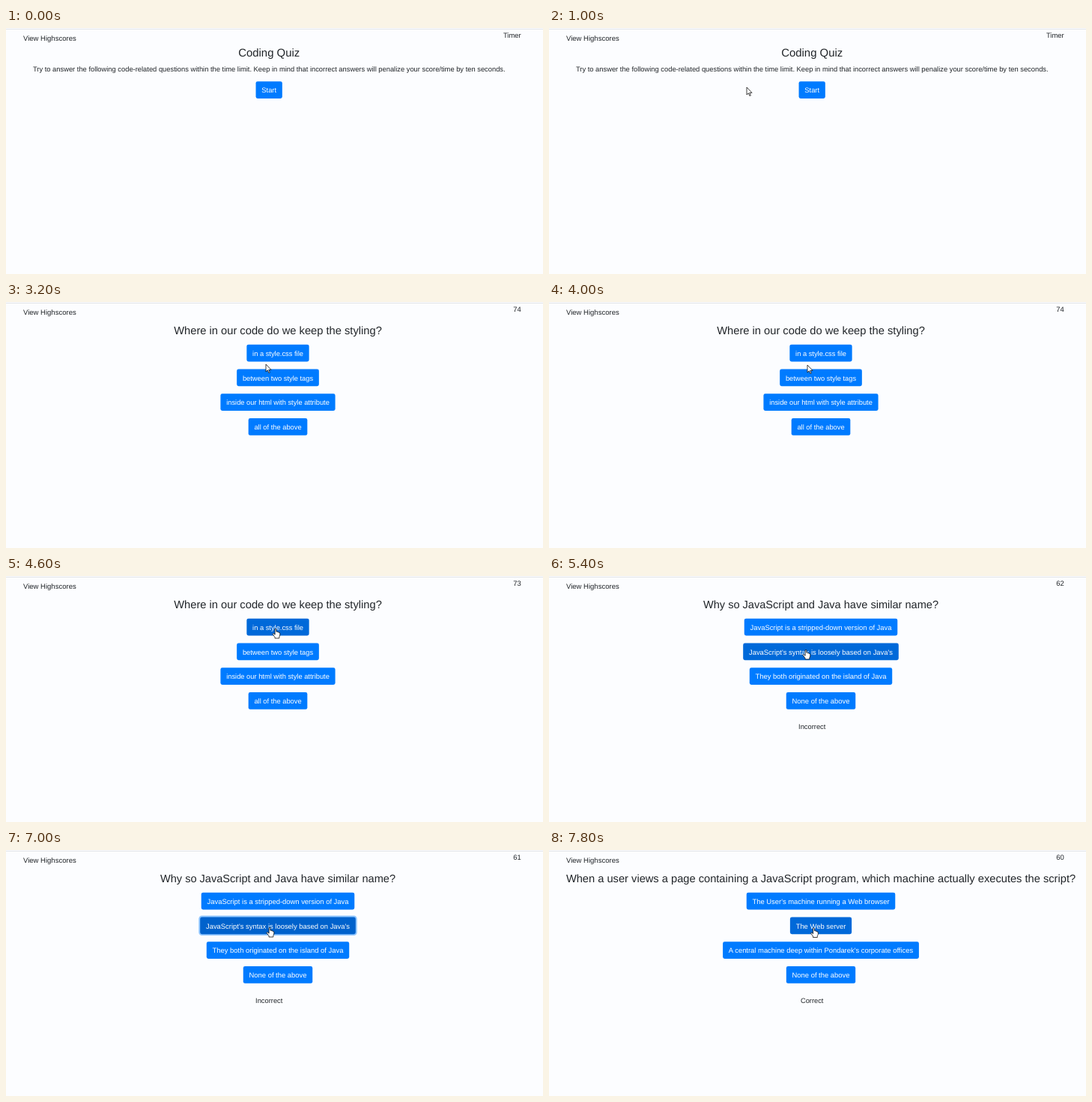
Animation of 717x328 px, one loop 8 s. Source, as an HTML page with a canvas:

```html
<!DOCTYPE html>
<html lang="en">
<head>
<meta charset="utf-8">
<title>Coding Quiz</title>
<style>
  html, body { margin: 0; height: 100%; overflow: hidden; background: #fcfdff; }
  canvas { display: block; }
</style>
</head>
<body>
<canvas id="stage" width="717" height="328"></canvas>
<script>
const ctx = document.getElementById('stage').getContext('2d');
const LOOP = 8000, STEP = 200;
const INK = '#212529';

// Each screen lasts until its end time; sizes are in px.
const screens = [
  { until: 2200, buttons: ['Start'], size: 9.4, mid: 351.2, top: 71.2 },
  { until: 5000, title: 'Where in our code do we keep the styling?', titleSize: 14.7, size: 9.32,
    buttons: ['in a style.css file', 'between two style tags',
      'inside our html with style attribute', 'all of the above'] },
  { until: 7200, title: 'Why so JavaScript and Java have similar name?', titleSize: 14.57, size: 9.43,
    result: 'Incorrect',
    buttons: ['JavaScript is a stripped-down version of Java',
      "JavaScript's syntax is loosely based on Java's",
      'They both originated on the island of Java', 'None of the above'] },
  { until: LOOP, title: 'When a user views a page containing a JavaScript program, which machine actually executes the script?',
    titleSize: 14.67, size: 9.42, result: 'Correct',
    buttons: ["The User's machine running a Web browser", 'The Web server',
      "A central machine deep within Pondarek's corporate offices", 'None of the above'] }
];

// Pointer route: time, x, y
const route = [
  [200, 665, 8], [400, 545, 34], [800, 176, 72], [1200, 352, 86], [1400, 351, 85],
  [2000, 352, 83], [2200, 347, 83], [3200, 347, 83], [3400, 294, 112], [3600, 340, 166],
  [3800, 310, 117], [4000, 345, 84], [4200, 352, 84], [4400, 358, 74], [4600, 360, 70],
  [5000, 360, 70], [5400, 343, 98], [5600, 312, 116], [6000, 281, 172], [6200, 276, 184],
  [6400, 290, 150], [6600, 340, 105], [6800, 352, 103], [7200, 352, 103], [7800, 353.5, 103.5]
];
const clicks = [2000, 4800, 7000];

const arrow = new Path2D('M0 0V10L2.3 7.9L3.9 11.5L5.4 10.9L3.8 7.4H7Z');
const hand = new Path2D('M-.9.8Q0-.4.9.8V4.2Q2.6 3.8 2.7 4.8Q4.2 4.4 4.3 5.4Q5.8 5.2 5.8 6.6V9L4.8 11.2V13H-1V11.5L-4 7.5Q-3.6 6-2.2 7L-.9 8.2Z');

function setFont(size) {
  ctx.font = `${size}px "Liberation Sans", Arial, sans-serif`;
  ctx.textRendering = 'geometricPrecision';
}

function text(str, x, y, size, align = 'center', color = INK) {
  setFont(size);
  ctx.textAlign = align;
  ctx.fillStyle = color;
  ctx.fillText(str, x, y);
}

function pointerAt(t) {
  if (t < route[0][0]) return null;
  const i = route.findIndex(p => p[0] > t);
  if (i < 0) return route[route.length - 1].slice(1);
  const [t0, x0, y0] = route[i - 1], [t1, x1, y1] = route[i];
  const k = (t - t0) / (t1 - t0);
  return [x0 + (x1 - x0) * k, y0 + (y1 - y0) * k];
}

// Draws a button and tells whether the pointer is over it.
function button(label, mid, top, size, pointer, pressed) {
  setFont(size);
  const h = 22.7, w = ctx.measureText(label).width + 15.5, x = mid - w / 2;
  const over = !!pointer && Math.abs(pointer[0] - mid) < w / 2 &&
    pointer[1] > top && pointer[1] < top + h;
  const box = (grow, color) => {
    ctx.beginPath();
    ctx.roundRect(x - grow, top - grow, w + 2 * grow, h + 2 * grow, 2.4 + grow);
    ctx.fillStyle = color;
    ctx.fill();
  };
  if (over && pressed) box(1.9, '#90c6ff');
  box(0, !over ? '#007bff' : pressed ? '#0062cc' : '#0069d9');
  text(label, mid, top + 15.1, size, 'center', '#fff');
  return over;
}

function drawPointer([x, y], shape) {
  ctx.save();
  ctx.translate(x, y);
  ctx.fillStyle = '#fff';
  ctx.strokeStyle = '#111';
  ctx.lineWidth = 0.8;
  ctx.fill(shape);
  ctx.stroke(shape);
  ctx.restore();
}

function timer(t) {
  if (t < 3200) return 'Timer';
  const penalty = t >= 5200 ? 10 : 0;
  return String(74 - Math.floor((t - 3200) / 1000) - penalty);
}

function draw(t) {
  ctx.fillStyle = '#fcfdff';
  ctx.fillRect(0, 0, 717, 328);
  ctx.fillStyle = '#e1e4e8';
  ctx.fillRect(0, 1, 717, 1);
  text('View Highscores', 23, 17.2, 9.53, 'left');
  text(timer(t), 687.7, 12.8, 9.45, 'right');

  const s = screens.find(s => t < s.until);
  if (s.title) {
    text(s.title, 363, 42.6, s.titleSize);
  } else {
    text('Coding Quiz', 351.2, 38, 14.9);
    text('Try to answer the following code-related questions within the time limit. Keep in mind that incorrect answers will penalize your score/time by ten seconds.', 351.3, 58, 9.35);
  }

  const pointer = pointerAt(t), pressed = clicks.includes(t);
  let over = false;
  s.buttons.forEach((label, i) => {
    const top = (s.top || 56.7) + i * 32.8;
    if (button(label, s.mid || 363, top, s.size, pointer, pressed)) over = true;
  });
  if (s.result) text(s.result, 351.2, 203.6, 9.3);
  if (pointer) drawPointer(pointer, over ? hand : arrow);
}

function tick() {
  const t = performance.now() % LOOP;
  draw(Math.floor(t / STEP) * STEP);
  requestAnimationFrame(tick);
}
tick();
</script>
</body>
</html>
```
